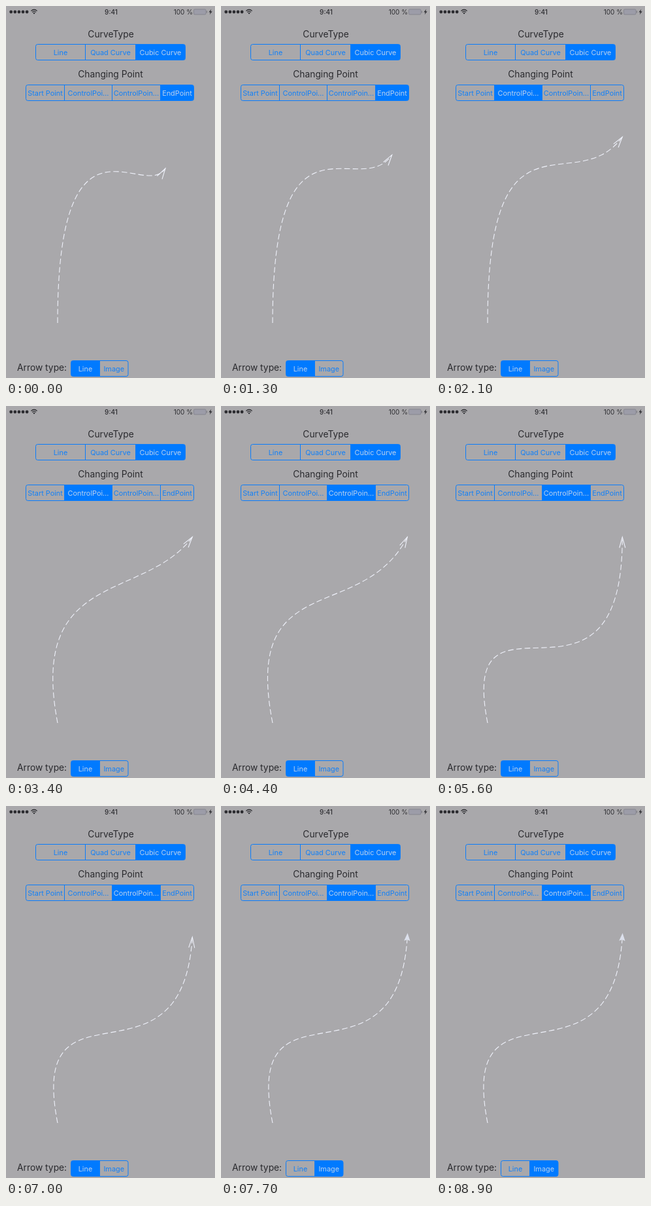
These frames come from a looping animation (320 px wide and 568 px high, 9.1 s). An HTML page:

```html
<!DOCTYPE html>
<html lang="en">
<head>
<meta charset="utf-8">
<title>Curve editor</title>
<style>
  html, body { margin: 0; width: 100%; height: 100%; overflow: hidden; background: #a9a8ab; }
  svg { display: block; width: 320px; height: 568px; font-family: Inter, Roboto, sans-serif; }
  .label { font-size: 13.8px; fill: #2a2a2e; }
  .status { font-size: 10px; fill: #2c2c30; }
  .bar text { font-size: 10.9px; text-anchor: middle; fill: #1480f6; }
  .bar rect { fill: none; }
  .bar rect.on { fill: #007aff; }
  .bar text.on { fill: #b9d0ee; }
  .bar .frame { fill: none; stroke: #0a7cfb; }
  .curve { fill: none; stroke: #eff1fa; stroke-width: 1.1; }
</style>
</head>
<body>
<svg id="stage" viewBox="0 0 320 568">
  <g fill="#2c2c30">
    <circle cx="7.7" cy="9" r="2.4"/><circle cx="13.8" cy="9" r="2.4"/><circle cx="19.9" cy="9" r="2.4"/>
    <circle cx="26" cy="9" r="2.4"/><circle cx="32.1" cy="9" r="2.4"/>
    <path d="M38.3 7.6Q43 3.4 47.7 7.6M40 9.5Q43 6.8 46 9.5" fill="none" stroke="#2c2c30" stroke-width="1.2"/>
    <path d="M41.3 10.8Q43 9.3 44.7 10.8L43 12.6Z"/>
    <path d="M314.3 4.8L310.5 9.6H312.9L311.8 13.3L315.7 8.3H313.3Z"/>
  </g>
  <rect x="287.5" y="5" width="18.5" height="8" rx="1.5" fill="#9c9ca8" stroke="#74747e" stroke-width=".6"/>
  <path d="M307.5 7.5V10.5" stroke="#74747e"/>
  <text class="status" x="161" y="12.6" text-anchor="middle" font-weight="500">9:41</text>
  <text class="status" x="286" y="12.6" text-anchor="end">100 %</text>
  <text class="label" x="160.5" y="48" text-anchor="middle">CurveType</text>
  <text class="label" x="160" y="109" text-anchor="middle">Changing Point</text>
  <text class="label" x="17" y="557">Arrow type:</text>
  <path class="curve" id="curve" stroke-dasharray="8.5 4.3"/>
  <path class="curve" id="lineArrow" d="M-16.5 -4.5L0 0L-16.5 4.5"/>
  <path id="imageArrow" d="M6 0L-6 -4.7L-4 0L-6 4.7Z" fill="#dce0ec"/>
</svg>
<script>
const LOOP = 9100, STEP = 100;
const stage = document.getElementById('stage');
const [curve, lineArrow, imageArrow] =
  ['curve', 'lineArrow', 'imageArrow'].map(id => document.getElementById(id));

function add(parent, tag, attributes, text = '') {
  const node = document.createElementNS('http://www.w3.org/2000/svg', tag);
  for (const name in attributes) node.setAttribute(name, attributes[name]);
  node.textContent = text;
  return parent.appendChild(node);
}

// Builds a segmented control and returns a function that selects a segment.
function segmentedBar(edges, top, labels) {
  const left = edges[0], width = edges[edges.length - 1] - left, height = 24;
  const bar = add(stage, 'g', { class: 'bar' });
  const outline = { x: left, y: top, width, height, rx: 3 };
  const clipId = 'clip' + Math.floor(top);
  add(add(bar, 'clipPath', { id: clipId }), 'rect', outline);
  const fills = add(bar, 'g', { 'clip-path': `url(#${clipId})` });
  const segments = labels.map((label, i) => {
    const x = edges[i], w = edges[i + 1] - x;
    const box = add(fills, 'rect', { x, y: top, width: w, height });
    const text = add(bar, 'text', { x: x + w / 2, y: top + 16 }, label);
    if (i) add(bar, 'path', { class: 'frame', d: `M${x} ${top}v${height}` });
    return [box, text];
  });
  add(bar, 'rect', { ...outline, class: 'frame' });
  return selected => segments.forEach((parts, i) =>
    parts.forEach(part => part.classList.toggle('on', i === selected)));
}

const selectCurve = segmentedBar([45.5, 121.5, 198.5, 274.5], 58.5, ['Line', 'Quad Curve', 'Cubic Curve']);
const selectPoint = segmentedBar([30.5, 89.5, 162.5, 236.5, 287.5], 120.5,
  ['Start Point', 'ControlPoi…', 'ControlPoin…', 'EndPoint']);
const selectArrow = segmentedBar([99.5, 143.5, 187], 541.5, ['Line', 'Image']);

// Drag paths as [time, x, y].
const start = [79, 484];
const control1Path = [[2100, 79, 136], [3100, 34, 249], [3300, 34, 249], [4000, 32, 245]];
const control2Path = [[4300, 212, 299], [4400, 216, 335], [5200, 280, 498],
  [5600, 286, 511], [6000, 290, 506], [6900, 270, 450]];
const endPath = [[1000, 244, 248], [1700, 285.3, 200]];

function pointAt(path, time) {
  const next = path.findIndex(key => key[0] > time);
  if (next === 0) return path[0].slice(1);
  if (next < 0) return path[path.length - 1].slice(1);
  const [t0, x0, y0] = path[next - 1], [t1, x1, y1] = path[next];
  const k = (time - t0) / (t1 - t0);
  return [x0 + (x1 - x0) * k, y0 + (y1 - y0) * k];
}

function draw(now) {
  const time = Math.floor((now % LOOP) / STEP) * STEP;
  const control1 = pointAt(control1Path, time);
  const control2 = pointAt(control2Path, time);
  const end = pointAt(endPath, time);
  const useImage = time >= 7700;

  selectPoint(time < 1900 ? 3 : time < 3700 ? 1 : 2);
  selectArrow(useImage ? 1 : 0);
  curve.setAttribute('d', `M${start}C${control1} ${control2} ${end}`);

  const angle = Math.atan2(end[1] - control2[1], end[0] - control2[0]) * 180 / Math.PI;
  for (const arrow of [lineArrow, imageArrow]) {
    arrow.setAttribute('transform', `translate(${end}) rotate(${angle})`);
    arrow.style.display = (arrow === imageArrow) === useImage ? '' : 'none';
  }
  requestAnimationFrame(() => draw(performance.now() - began));
}

selectCurve(2);
const began = performance.now();
draw(0);
</script>
</body>
</html>
```
